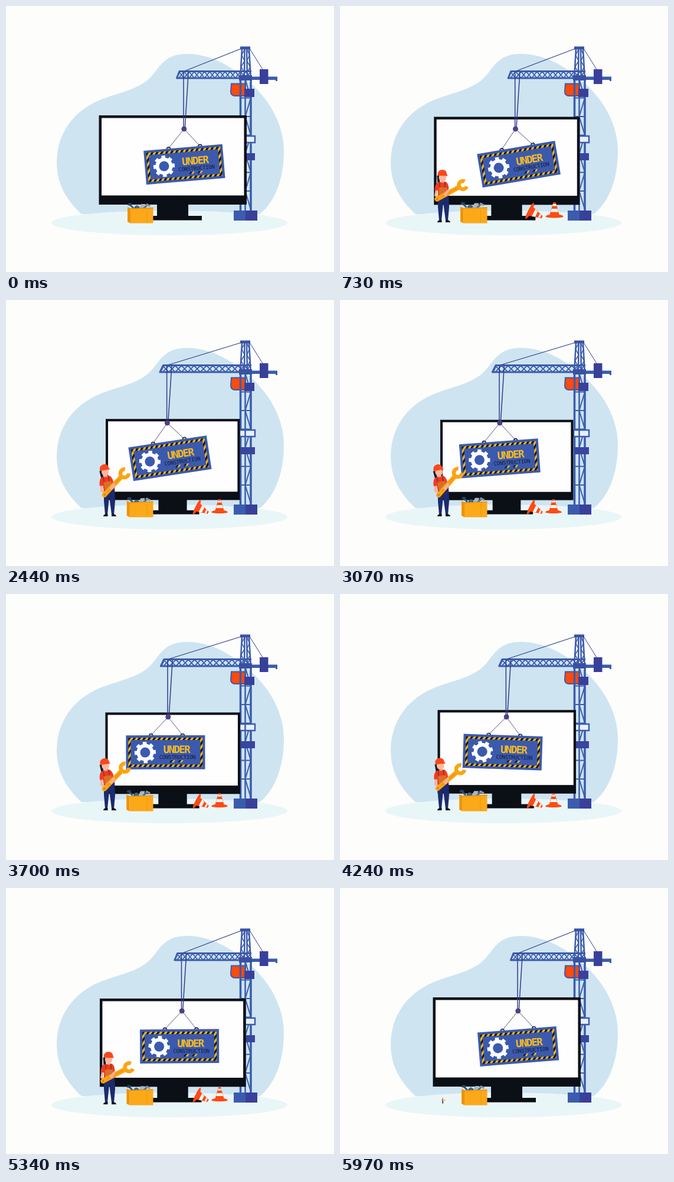
Animation of 556 by 450 pixels, one loop 6000 ms. Source, as an HTML page:

```html
<!DOCTYPE html>
<html lang="en">
<head>
<meta charset="utf-8">
<title>Under construction</title>
<style>
  html, body { margin: 0; width: 100%; height: 100%; overflow: hidden; background: #fdfdfc; }
  svg { display: block; width: 100vw; height: 100vh; }
  text { font-family: "DejaVu Sans Mono", "Noto Sans Mono", monospace; text-anchor: middle; }
  .title { font-size: 17.5px; font-weight: 700; letter-spacing: -1.7px; fill: #fbbb1c; }
  .sub { font-size: 9px; letter-spacing: -.3px; fill: #151c33; }
  .line { fill: none; stroke: #3b5cab; }
  .rope { fill: none; stroke: #2f3c88; }
</style>
</head>
<body>
<svg viewBox="0 0 556 450">
  <defs>
    <pattern id="hazard" width="7" height="7" patternUnits="userSpaceOnUse" patternTransform="rotate(35)">
      <rect width="7" height="7" fill="#f9b91f"/>
      <rect width="3.500" height="7" fill="#14161f"/>
    </pattern>
    <g id="cone">
      <path d="M-8-3L-2-24H2L8-3Z" fill="#ff4a12"/>
      <path d="M-6-9L-4.300-14H4.300L6-9ZM-3.200-18.500L-2.400-21.500H2.400L3.200-18.500Z" fill="#fff"/>
      <path d="M-14-2Q-13-4-8-5H8Q13-4 14-2Q12 0 0 0Q-12 0-14-2Z" fill="#ff4a12"/>
    </g>
  </defs>

  <path fill="#cee4f1" d="M128 352C104 330 86 302 86 265C86 222 108 187 143 167C174 149 211 147 238 127C259 111 263 81 306 81C343 81 379 98 414 130C451 163 471 205 471 245C471 291 457 331 430 352Z"/>
  <ellipse cx="277" cy="367" rx="200" ry="21" fill="#e9f6f8"/>

  <path d="M382 131.500H406V152H387Q381 151 381 145Z" fill="#ff4a0c" stroke="#3b5cab" stroke-width="2"/>
  <g id="mast">
    <path class="line" stroke-width="3.500" d="M397.500 124V347M415 124V347"/>
    <path class="line" stroke-width="2.500" d="M405.500 124V347"/>
    <path class="line" id="mastLattice" stroke-width="2"/>
    <path class="line" stroke-width="2.500" d="M400 72L397 124M412 72L415 124M404.500 72L404 124M408 72L409 124"/>
    <path class="line" id="topLattice" stroke-width="1.500"/>
    <rect x="397" y="68.500" width="17" height="5" fill="#3b52a3"/>
    <path class="rope" stroke-width="1" d="M413 72L436 109"/>
    <path d="M416 119.500H460V127H457V125H416Z" fill="#3b5cab"/>
    <rect x="430" y="107" width="14.500" height="25" fill="#39409a"/>
    <rect x="404" y="140" width="17" height="14" fill="#39409a"/>
    <rect x="396" y="220" width="26" height="11" fill="#e8f0fa" stroke="#3b5cab" stroke-width="2.500"/>
    <path class="line" stroke-width="2.500" d="M405.500 220V231"/>
    <rect x="397" y="249" width="25" height="12" fill="#39459f"/>
    <rect x="386" y="346" width="20" height="17" fill="#3b5cae"/>
    <rect x="406" y="346" width="20" height="17" fill="#39409a"/>
  </g>

  <g id="monitor" fill="#0b0f16">
    <path d="M256 334H309V355H332V362.500H233V355H256Z"/>
    <rect x="157.500" y="185" width="250.500" height="151"/>
    <rect x="162" y="189.500" width="241.500" height="131" fill="#fefefe"/>
  </g>

  <g id="jib">
    <path class="line" stroke-width="3" stroke-linejoin="round" d="M416 110.500H294L289.500 122H416"/>
    <path class="line" id="jibLattice" stroke-width="1.700"/>
  </g>
  <rect x="395" y="117" width="22" height="9" fill="#3a51a3"/>
  <path id="stay" class="rope" stroke-width="1.300"/>

  <g id="hook">
    <path class="rope" stroke-width="1.500" d="M-.8-97V-2M7.500-97L1.500-2"/>
    <g id="sign">
      <path fill="none" stroke="#4a4a80" stroke-width=".9" d="M-29.500 31L0 0L24.500 31"/>
      <g fill="none" stroke="#1c2440" stroke-width="1.600">
        <circle cx="-29" cy="31.500" r="3"/><circle cx="24.500" cy="31.500" r="3"/>
      </g>
      <rect x="-71.500" y="31" width="134" height="57.500" fill="#3b5aae"/>
      <path fill="url(#hazard)" fill-rule="evenodd" d="M-67.500 35H58.500V84.500H-67.500ZM-63.500 39V80.500H54.500V39Z"/>
      <g transform="translate(-39 60)">
        <g id="gear" stroke="#fff">
          <circle r="11.500" fill="none" stroke-width="6"/>
          <path id="teeth" stroke-width="6.500"/>
        </g>
      </g>
      <text class="title" x="14" y="61">UNDER</text>
      <text class="sub" x="15.500" y="71">CONSTRUCTION</text>
      <path d="M2 77l3-4h3l-3 4ZM16 77l3-4h3l-3 4Z" fill="#151c33"/>
      <path d="M6 77l3-4h3l-3 4ZM20 77l3-4h3l-3 4Z" fill="#f9b91f"/>
    </g>
    <circle r="4" fill="#5d3c78" stroke="#39409a" stroke-width="1"/>
  </g>

  <g id="box">
    <g id="tools">
      <path d="M216 342L209 335" stroke="#2f5f86" stroke-width="3"/>
      <path d="M206 337l2-4 6 1-2 4Z" fill="#2b4160"/>
      <path d="M217 343q2-7 7-5l5 5Z" fill="#2b4a6d"/>
      <path d="M225 343l4-8h7l-2 8Z" fill="#a4b8c8"/>
      <path d="M233 343l8-8" stroke="#4d6f92" stroke-width="3"/>
      <path d="M238 334l7 3-1 3-7-3Z" fill="#7f97ac"/>
      <circle cx="222" cy="340" r="2.500" fill="#3c6c92"/>
    </g>
    <path d="M206 341L211 343V367.500L206 365Z" fill="#ee9300"/>
    <path d="M211 343L249.500 341.500V367.500H211Z" fill="#fba819"/>
    <path d="M206 341L211 343L249.500 341.500" fill="none" stroke="#f08d00" stroke-width="1.500"/>
    <path d="M239 345V367" stroke="#f09a08"/>
  </g>

  <g id="cones">
    <use href="#cone" transform="translate(321.500 349) rotate(117)"/>
    <use href="#cone" transform="translate(362 361)"/>
  </g>

  <g id="man">
    <path d="M166 316H184L185 340L183 363H179L175 332L172 363H168L166 340Z" fill="#1d2a6c"/>
    <path d="M165 366q0-3 4-4h3.500v4ZM179 366v-4h3.500q4 1 4.500 4Z" fill="#12121c"/>
    <g id="body">
      <path d="M164.500 287h5v9q-1 6-4 6Z" fill="#201a24"/>
      <path d="M162 310L160 321L167 327L169 324L164 319L166 311Z" fill="#f7b096"/>
      <path d="M167 298L179 297Q184 300 184.500 308L184 321H166V312H160.500Q161 300 167 298Z" fill="#f4391f"/>
      <path d="M169 298V308M178 298V308" stroke="#7a3a2e" stroke-width="1.500"/>
      <path d="M168 307H181V321H168Z" fill="#d8702a"/>
      <rect x="171.500" y="292" width="5" height="7" fill="#eea084"/>
      <ellipse cx="174" cy="290" rx="6.300" ry="7" fill="#fbb9a0"/>
      <path d="M165.500 287Q165 277.500 173.500 277Q181 277 181.500 285L183 287.500Z" fill="#f9481c"/>
    </g>
    <g id="wrench">
      <path d="M-12-4H33V4H-12Q-16 4-16 0Q-16-4-12-4Z" fill="#fba414"/>
      <path d="M6.700-2A7 7 0 1 0 2.500 6.500" transform="translate(38 0) rotate(-20)" fill="none" stroke="#fba414" stroke-width="6.500"/>
      <circle cx="-11.500" r="1.500" fill="#d97d08"/>
      <path d="M-4 0H27" stroke="#f08f08" stroke-width="1.500"/>
    </g>
    <path d="M184 309L185 314L179 322L175 319L180 313Z" fill="#f7b096"/>
  </g>
</svg>
<script>
const LOOP = 6000, PIVOT = 416;
const el = id => document.getElementById(id);
const place = (id, value) => el(id).setAttribute('transform', value);
const path = (id, d) => el(id).setAttribute('d', d);
const clamp = v => Math.min(1, Math.max(0, v));

// Zigzag between two rails, crossing over when `both` is set.
function lattice(count, rail, both) {
  let d = '';
  for (let i = 0; i < count; i++) {
    const a = i % 2;
    d += `M${rail(i, a)}L${rail(i + 1, 1 - a)}`;
    if (both) d += `M${rail(i, 1 - a)}L${rail(i + 1, a)}`;
  }
  return d;
}

let mast = lattice(7, (i, side) => [side ? 415 : 405.5, 124 + i * 31.5]);
for (let i = 1; i < 7; i++) mast += `M398 ${124 + i * 31.5}H415`;
path('mastLattice', mast);

const leg = sign => lattice(5, (i, side) => [406.3 + sign * (side ? 6 + i * 0.6 : 2), 73 + i * 10]);
path('topLattice', leg(-1) + leg(1));
path('jibLattice', lattice(14, (i, side) => [293 + i * 8.7, side ? 122 : 111], true));

let teeth = '';
for (let i = 0; i < 8; i++) {
  const a = i * Math.PI / 4, x = Math.cos(a), y = Math.sin(a);
  teeth += `M${x * 12} ${y * 12}L${x * 18} ${y * 18}`;
}
path('teeth', teeth);

// Scale of a part that pops in and later shrinks away.
function pop(t, start, inTime, end, outTime) {
  const rise = clamp((t - start) / inTime);
  const fall = clamp((t - end + outTime) / outTime);
  return Math.min(1 - (1 - rise) ** 2, 1 - fall ** 2);
}

const scaleAt = (x, y, sx, sy = sx) =>
  `translate(${x} ${y}) scale(${sx} ${sy}) translate(${-x} ${-y})`;

function show(id, scale, transform) {
  el(id).style.display = scale > 0.01 ? '' : 'none';
  place(id, transform);
}

function draw(t) {
  const phase = t / LOOP * 2 * Math.PI;
  const swing = Math.cos(phase), twice = Math.cos(phase * 2);
  const tip = 273.3 + 15.5 * swing, hookX = tip + 13;

  place('jib', scaleAt(PIVOT, 0, (PIVOT - tip) / (PIVOT - 288.8), 1));
  path('stay', `M399 72L${tip + 14} 110`);
  place('hook', `translate(${hookX} 208)`);
  place('sign', `rotate(${-4.8 - 7 * Math.sin(phase)})`);
  place('gear', `rotate(${360 * t / LOOP})`);
  place('monitor', scaleAt(282.5, 362, 0.95 + 0.05 * swing));

  const wide = (45.5 - 2 * twice) / 43.5;
  place('box', scaleAt(249.5, 367.5, wide, 1 + (wide - 1) / 2));
  place('tools', `translate(0 ${-0.8 * Math.sin(phase * 2)})`);

  const man = pop(t, 0, 500, LOOP, 500);
  show('man', man, scaleAt(174, 365, man));
  place('body', `rotate(${-5 + 6.6 * swing} 175 322)`);
  place('wrench', `translate(175 321) rotate(${-37 + 12 * swing})`);

  const cones = pop(t, 50, 500, 5950, 500);
  const settle = 1 - clamp((t - 600) / 350);
  const size = cones * (1 + 0.15 * settle);
  show('cones', cones, `translate(0 ${-5 * settle}) ` + scaleAt(345, 355, size));
}

function frame(now) {
  draw(now % LOOP);
  requestAnimationFrame(frame);
}
draw(0);
requestAnimationFrame(frame);
</script>
</body>
</html>
```
